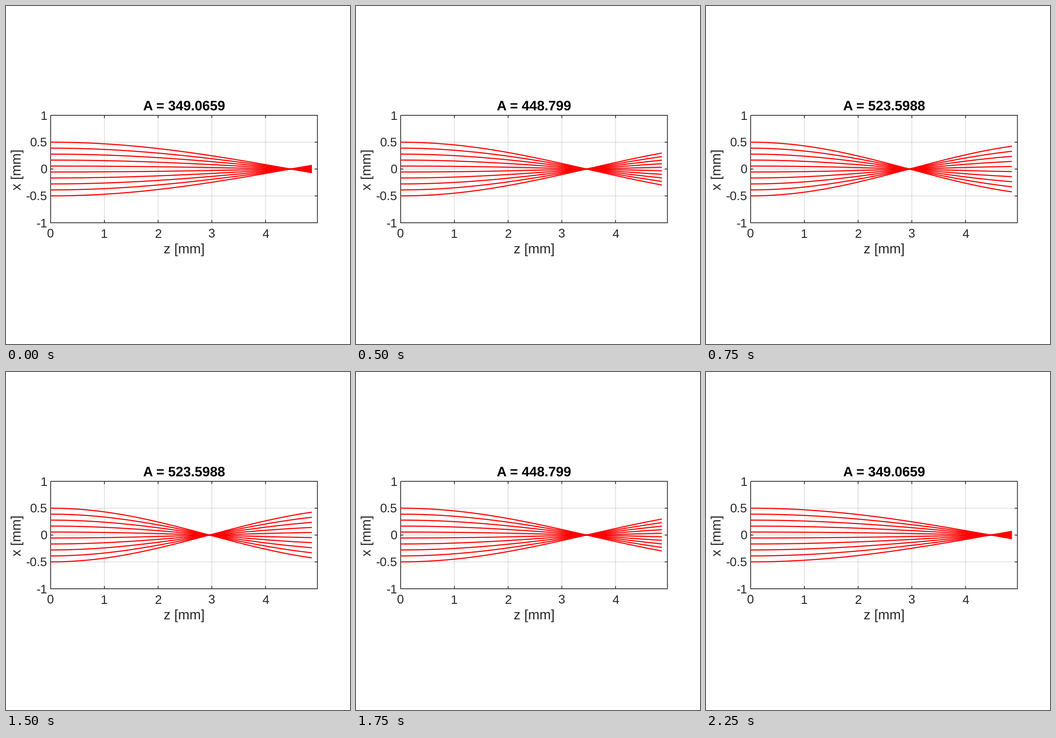
Animation, 755 px wide and 742 px high, one loop 2.5 s. Source, as a matplotlib script:

```python
import numpy as np
import matplotlib.pyplot as plt
from matplotlib.animation import FuncAnimation

W, H, DPI = 755, 742, 64
PT = 72 / DPI                      # points per pixel
LEFT, RIGHT, TOP, BOTTOM = 98.0, 683.5, 240.0, 475.8
UNIT = (BOTTOM - TOP) / 2          # pixels per millimetre
MID = (TOP + BOTTOM) / 2
INK = "#262626"
DIVISORS = [9, 8, 7, 6, 5, 5, 6, 7, 8, 9]
Z_END = 4.863

plt.rcParams["font.family"] = "Liberation Sans"
plt.rcParams["text.hinting"] = "none"

fig = plt.figure(figsize=(W / DPI, H / DPI), dpi=DPI, facecolor="white")
ax = fig.add_axes([0, 0, 1, 1])
ax.set_xlim(0, W)
ax.set_ylim(H, 0)
ax.axis("off")


def px_x(z):
    return LEFT + UNIT * z


def px_y(x):
    return MID - UNIT * x


def line(xs, ys, color=INK, width=1.7, **kw):
    return ax.plot(xs, ys, color=color, lw=width * PT, snap=False,
                   solid_capstyle="butt", **kw)[0]


def label(x, y, text, size, color=INK, ha="center", **kw):
    return ax.text(x, y, text, fontsize=size * PT, color=color, ha=ha,
                   va="baseline", **kw)


def draw_axes():
    tick = 5.9
    for z in range(1, 5):
        x = px_x(z)
        line([x, x], [TOP, BOTTOM], alpha=0.15, zorder=1)
        line([x, x], [TOP, TOP + tick], zorder=2)
        line([x, x], [BOTTOM, BOTTOM - tick], zorder=2)
    for v in (-0.5, 0, 0.5):
        y = px_y(v)
        line([LEFT, RIGHT], [y, y], alpha=0.15, zorder=1)
        line([LEFT, LEFT + tick], [y, y], zorder=2)
        line([RIGHT, RIGHT - tick], [y, y], zorder=2)
    line([LEFT, RIGHT, RIGHT, LEFT, LEFT], [TOP, TOP, BOTTOM, BOTTOM, TOP],
         zorder=2, solid_joinstyle="miter")

    for z in range(5):
        label(px_x(z), 508.7, str(z), 27.3)
    for v in (-1, -0.5, 0, 0.5, 1):
        label(91, px_y(v) + 9.8, f"{v:g}", 27.3, ha="right")
    label(390.7, 542.7, "z [mm]", 30)
    label(32.5, 358.5, "x [mm]", 30, rotation=90, rotation_mode="anchor")


draw_axes()
title = label(390.7, 229.5, "", 30, color="black", weight="bold")
heights = np.linspace(-0.5, 0.5, 10)
z = np.linspace(0, Z_END, 200)
rays = [line([], [], "red", 2.4, zorder=3) for _ in heights]


def update(i):
    a = np.pi / DIVISORS[i]
    focus = np.pi / (2 * a) - 0.088 * a
    profile = np.cos(np.pi / 2 * z / focus)
    for ray, h in zip(rays, heights):
        ray.set_data(px_x(z), px_y(h * profile))
    title.set_text(f"A = {1000 * a:.7g}")
    return [*rays, title]


anim = FuncAnimation(fig, update, frames=len(DIVISORS), interval=250,
                     repeat=True, repeat_delay=0)
plt.show()
```
